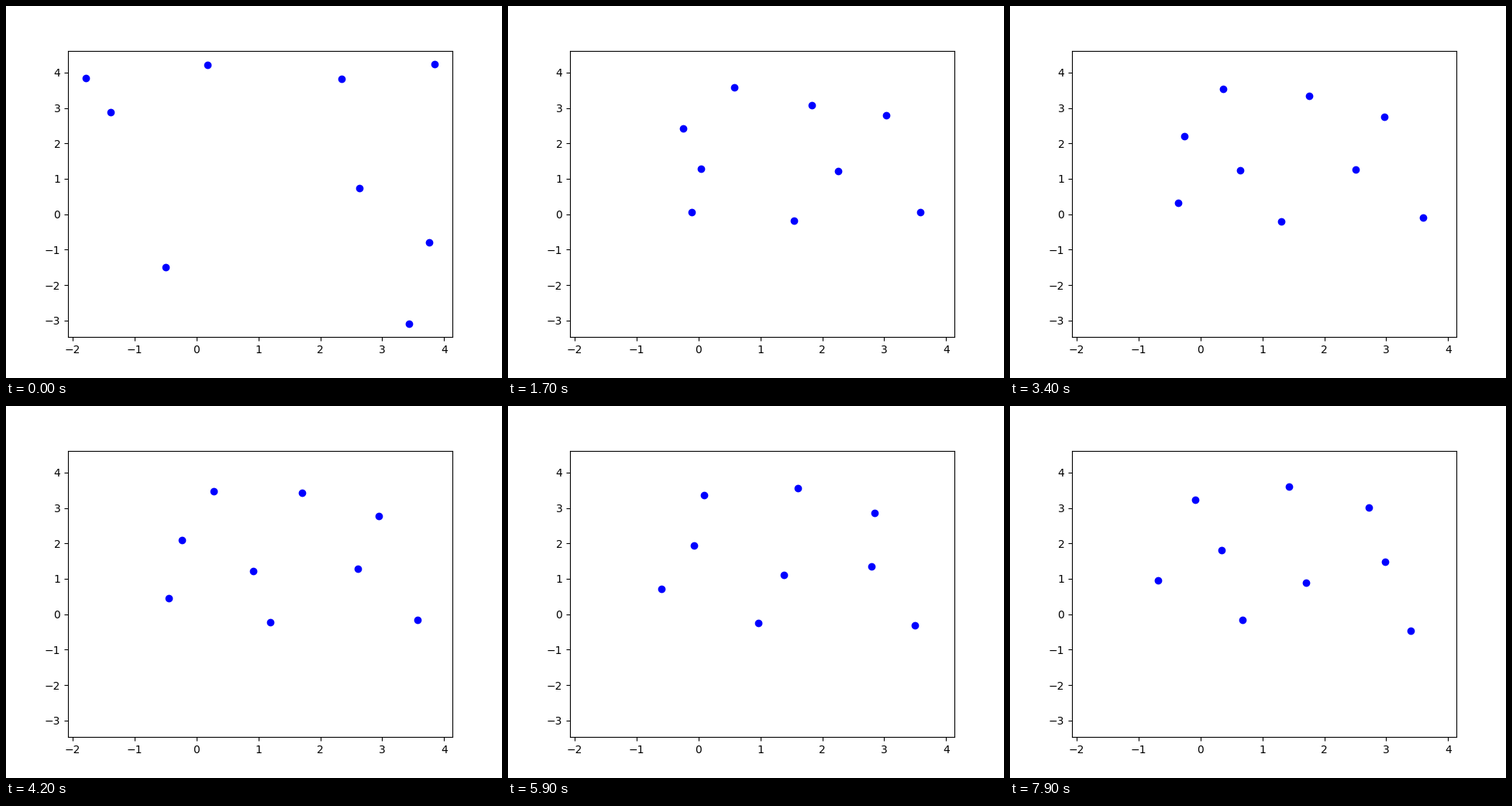
A matplotlib script for the animation above (8000 ms loop, 640 by 480 pixels).

```python
import numpy as np
import matplotlib.pyplot as plt
from matplotlib.animation import FuncAnimation

FRAMES, STEP_MS = 80, 100
ORIGIN = np.array([245.9, 268.67])   # stage position of (0, 0)
UNIT = np.array([79.85, -45.67])     # stage pixels per data unit

# Key poses of the nine agents, in stage pixels
POSES = {
    0.0: [(103, 93), (135, 137), (260, 76), (433, 94), (553, 75),
          (456, 235), (546, 305), (520, 410), (206, 337)],
    1.0: [(217, 152), (241, 204), (299, 110), (398, 133), (488, 133),
          (414, 215), (523, 265), (384, 285), (247, 265)],
    2.5: [(226, 163), (271, 211), (284, 105), (389, 122), (486, 143),
          (436, 212), (534, 269), (359, 276), (227, 261)],
    5.1: [(232, 177), (340, 215), (260, 113), (378, 108), (477, 140),
          (462, 209), (528, 280), (332, 280), (203, 241)],
    7.9: [(273, 186), (382, 228), (239, 121), (360, 104), (463, 131),
          (484, 201), (517, 290), (300, 276), (191, 225)],
}


def to_data(stage):
    return (np.asarray(stage) - ORIGIN) / UNIT


def modes(t):
    """Slow quadratic drift plus a settling and a rushing decay."""
    return np.array([1, t, t * t, np.exp(-t / 0.6), np.exp(-t / 0.2)])


# Weights of the modes that carry every agent through its key poses
keys = np.array([to_data(pose) for pose in POSES.values()])
basis = np.array([modes(t) for t in POSES])
weights = np.linalg.solve(basis, keys.reshape(len(POSES), -1))


def positions(frame):
    t = frame * STEP_MS / 1000
    return (modes(t) @ weights).reshape(-1, 2).T


fig, ax = plt.subplots(figsize=(6.4, 4.8), dpi=100)
dots, = ax.plot(*positions(0), "bo")
(left, bottom), (right, top) = to_data([(80, 427.2), (576, 57.6)])
ax.set(xlim=(left, right), ylim=(bottom, top))


def update(frame):
    dots.set_data(*positions(frame))
    return dots,


anim = FuncAnimation(fig, update, frames=FRAMES, interval=STEP_MS,
                     repeat=True, repeat_delay=0)
plt.show()
```
